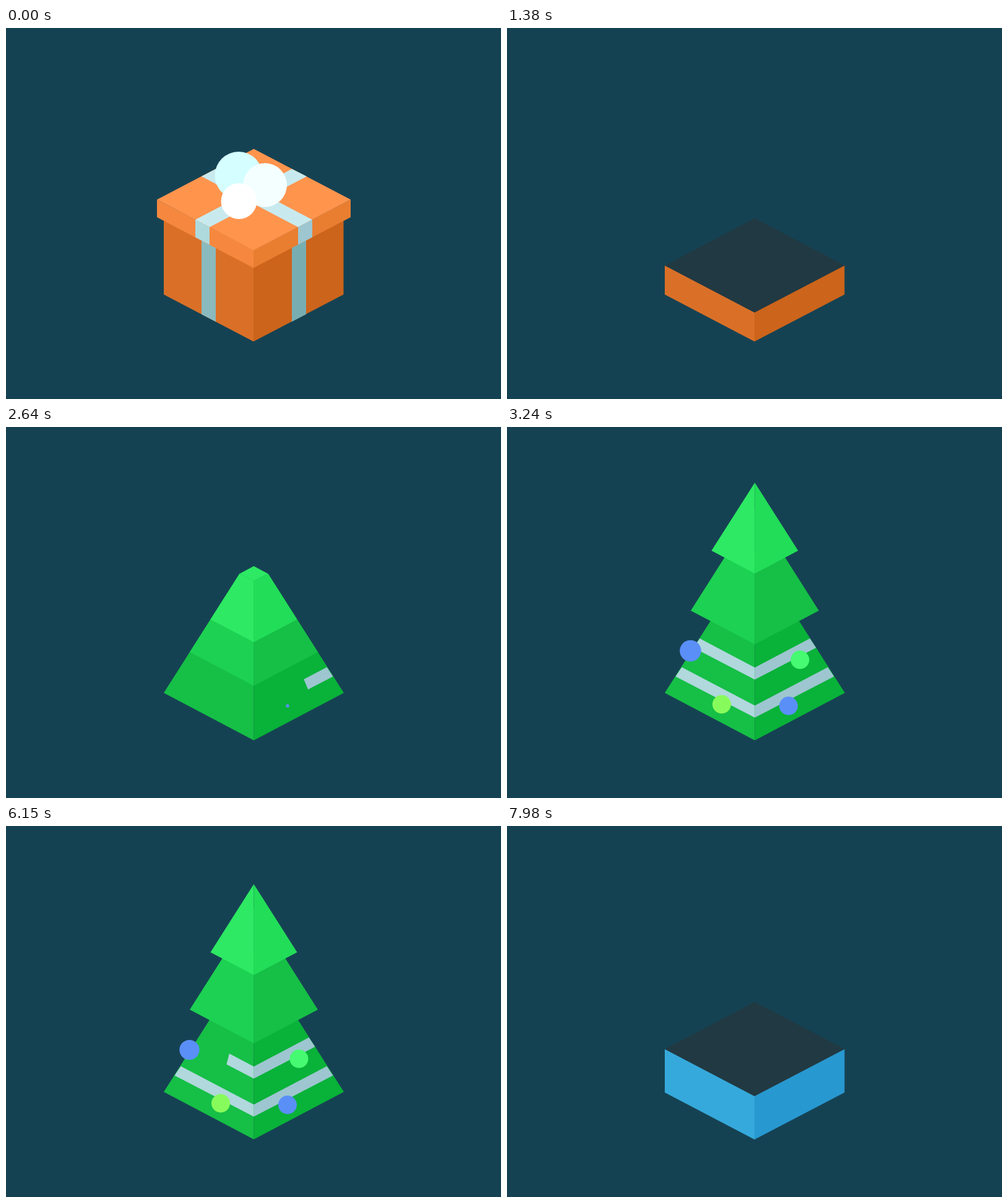
An HTML page with a canvas that plays this animation: 800x600 px, repeating every 8 s.

```html
<!DOCTYPE html>
<html lang="en">
<head>
<meta charset="utf-8">
<title>Gift and tree</title>
<style>
html, body { margin: 0; width: 100%; height: 100%; overflow: hidden; background: #154253; }
canvas { display: block; }
</style>
</head>
<body>
<canvas id="stage" width="800" height="600"></canvas>
<script>
const ctx = document.getElementById('stage').getContext('2d');
const LOOP = 8000;
const BG = '#154253', DARK = [33, 57, 66], GREEN = [45, 233, 99];
const LIME = '#88fb5c', BLUE = '#5a8ff8', MINT = '#46fa71';
const CX = 400.5, ISO = 0.527;

const clamp = v => Math.max(0, Math.min(1, v));
const span = (t, start, length) => clamp((t - start) / length);
const lerp = (a, b, u) => a + (b - a) * u;
const mixPoint = (a, b, u) => [lerp(a[0], b[0], u), lerp(a[1], b[1], u)];
const backIn = (u, s) => u * u * ((s + 1) * u - s);
const backOut = (u, s) => 1 - backIn(1 - u, s);
const smooth = u => u * u * (3 - 2 * u);

function poly(color, ...pts) {
  ctx.fillStyle = color;
  ctx.beginPath();
  pts.forEach(p => ctx.lineTo(p[0], p[1]));
  ctx.closePath();
  ctx.fill();
}

function disc(color, x, y, r) {
  if (r <= 0) return;
  ctx.fillStyle = color;
  ctx.beginPath();
  ctx.arc(x, y, r, 0, Math.PI * 2);
  ctx.fill();
}

function diamond(color, y, w) {
  const h = w * ISO;
  poly(color, [CX - w, y], [CX, y - h], [CX + w, y], [CX, y + h]);
}

function fadedDiamond(from, to, u) {
  const c = from.map((v, i) => Math.round(lerp(v, to[i], u)));
  diamond(`rgb(${c})`, 430.5, 144.5);
}

// ---------- gift ----------

function box(height, left, right) {
  const y = 431 - height;
  diamond(`rgb(${DARK})`, y, 145.5);
  poly(left, [255, y], [400, y + 76], [400, 507], [255, 431]);
  poly(right, [400, y + 76], [545.5, y], [545.5, 431], [400, 507]);
}

// A vertical ribbon that shortens towards its lower edge
function drape(color, x1, y1, x2, y2, len) {
  if (len > 0) poly(color, [x1, y1 - len], [x2, y2 - len], [x2, y2], [x1, y1]);
}

// Half of a band on the lid, measured from the lid's edge
function arm(a, b, farA, farB, size) {
  if (size > 0) poly('#c8eaee', a, b, mixPoint(b, farB, size), mixPoint(a, farA, size));
}

function lid(t) {
  const scale = 1 - backIn(span(t, 945, 295), 1.70158);
  if (scale <= 0) return;
  ctx.save();
  ctx.translate(400, 352);
  ctx.scale(scale, scale);
  ctx.translate(-400, -352);
  poly('#f5883e', [244, 277.5], [400, 359], [400, 388], [244, 306]);
  poly('#e97e31', [400, 359], [557, 277.5], [557, 306], [400, 388]);
  poly('#ff944d', [400.5, 195.5], [557, 277.5], [400, 359.5], [244, 277.5]);

  const size = 0.51 * (1 - span(t, 690, 280)) ** 1.6;
  const bands = [
    [[316, 240], [339, 228], [472, 322], [495, 310]],
    [[486, 240], [462, 228], [329, 322], [306, 310]]
  ];
  for (const [a, b, c, d] of bands) {
    arm(a, b, c, d, size);
    arm(c, d, a, b, size);
  }
  const len = 28.5 * (1 - span(t, 930, 90));
  drape('#aed9dd', 306, 338.5, 329, 350.5, len);
  drape('#9dc6d0', 472, 350.5, 495, 338.5, len);
  ctx.restore();
}

function gift(t) {
  const height = 125 * (1 - span(t, 1210, 440)) ** 2;
  if (height < 0.3) return fadedDiamond(DARK, GREEN, span(t, 1610, 180));
  box(height, '#da7028', '#cc641b');
  const len = Math.min(height, 125 * (1 - span(t, 1000, 220)));
  drape('#8bbabe', 316, 463, 339, 475, len);
  drape('#78aeb2', 462, 475, 485, 463, len);
  lid(t);
  const pompoms = [
    ['#d4feff', 376, 238.5, 38.5, 590],
    ['#f4ffff', 418.5, 254, 35.5, 540],
    ['#ffffff', 376.5, 280, 29, 490]
  ];
  for (const [color, x, y, r, start] of pompoms) {
    disc(color, x, y, r * (1 - backIn(span(t, start, 260), 1.7)));
  }
}

// ---------- tree ----------

const APEX = 201, SLOPE = 1.574;
const TIERS = [
  { w: 145.5, left: '#16bf46', right: '#09b239' },
  { w: 103.5, left: '#1dd152', right: '#16bf46' },
  { w: 70, left: '#2de963', right: '#22dd58' }
];

// Half width and height of the upper edge, height at the middle, then
// start and length of: right in, left in, right out, left out
const STRIPES = [
  { tier: 0, w: 118, y: 388.5, mid: 450.5, on: [2600, 130, 2730, 150], off: [6865, 90, 6570, 270] },
  { tier: 0, w: 89, y: 342, mid: 389, on: [2900, 130, 3030, 150], off: [6240, 200, 6040, 200] },
  { tier: 1, w: 75, y: 252, mid: 292, on: [3300, 230, 3570, 265], off: [5760, 255, 5550, 210] },
  { tier: 2, w: 38, y: 153, mid: 176, on: [3850, 170, 4030, 170], off: [5360, 160, 5210, 150] }
];
const SHADES = [['#b0d8dd', '#9dc6d0'], ['#c8e2e8', '#b0d5dc'], ['#dcf3f6', '#c8e2e8']];

// Tier, colour, place, start of growing and of shrinking
const BALLS = [
  [0, BLUE, 455, 451, 2630, 6800],
  [0, LIME, 347, 448.5, 2720, 6500],
  [0, MINT, 473.5, 376.5, 2910, 6300],
  [0, BLUE, 296.5, 362, 3078, 6080],
  [1, LIME, 446.5, 298, 3400, 5700],
  [1, MINT, 342, 237.5, 3650, 5530],
  [2, BLUE, 436.5, 154.5, 3870, 5320]
];

function frustum(tier, base, apex, cut) {
  const top = Math.max(apex, cut);
  if (top >= base) return;
  const W = tier.w, w = (top - apex) / SLOPE;
  const low = [CX, base + W * ISO], high = [CX, top + w * ISO];
  poly(tier.left, [CX - W, base], low, high, [CX - w, top]);
  poly(tier.right, [CX + W, base], low, high, [CX + w, top]);
}

function stripeSide(s, side, from, to, color) {
  if (to <= from) return;
  const upper = u => [CX + side * s.w * u, lerp(s.mid, s.y, u)];
  const lower = u => [CX + side * (s.w + 10) * u, lerp(s.mid + 19.5, s.y + 15, u)];
  poly(color, upper(from), upper(to), lower(to), lower(from));
}

function stripe(s, t) {
  const [r, rl, l, ll] = s.on, [ro, rol, lo, lol] = s.off;
  const right = span(t, r, rl) - span(t, ro, rol);
  const left = span(t, l, ll) - span(t, lo, lol);
  stripeSide(s, 1, 1 - right, 1, SHADES[s.tier][1]);
  stripeSide(s, -1, 0, left, SHADES[s.tier][0]);
}

function star(t) {
  const grow = backOut(span(t, 4190, 460), 2.2);
  const scale = t < 5200 ? grow : 1 - backIn(span(t, 5200, 280), 1.7);
  if (t < 4190 || scale <= 0.01) return;
  const turn = -0.09 - 0.9 * (1 - smooth(span(t, 4190, 460))) - 0.9 * span(t, 5200, 280) ** 2;
  ctx.save();
  ctx.translate(398.4, 82.4);
  ctx.rotate(turn);
  ctx.scale(scale, scale);
  ctx.beginPath();
  for (let i = 0; i < 10; i++) {
    const r = i % 2 ? 11.8 : 25.8, a = i * Math.PI / 5;
    ctx.lineTo(r * Math.sin(a), -r * Math.cos(a));
  }
  ctx.closePath();
  ctx.fillStyle = ctx.strokeStyle = LIME;
  ctx.lineWidth = 5;
  ctx.lineJoin = 'round';
  ctx.fill();
  ctx.stroke();
  ctx.restore();
}

// How far a tier has lifted off the one below, 0 to 1 with overshoot
function lift(t, start, end) {
  return t < 5000 ? backOut(span(t, start, 545), 6) : 1 - backIn(backTime(t, end), 6);
}
function backTime(t, end) {
  return span(t, end - 560, 560);
}

function tree(t) {
  const rise = t < 5000
    ? 1 - Math.cos(span(t, 2205, 485) * Math.PI / 2)
    : 1 - Math.sin(span(t, 6765, 315) * Math.PI / 2);
  if (rise < 0.001) return fadedDiamond(GREEN, DARK, span(t, 7080, 510));

  const cut = lerp(430, APEX, rise);
  const lift2 = 67 * lift(t, 2690, 6765);
  const lift3 = lift2 + 40 * lift(t, 2774, 6720);
  const lifts = [0, lift2, lift3];
  const whole = rise > 0.999;

  TIERS.forEach((tier, i) => {
    const apex = APEX - lifts[i];
    frustum(tier, apex + tier.w * SLOPE, apex, whole ? apex : cut);
    if (i === 0 && !whole) diamond(`rgb(${GREEN})`, cut, (cut - APEX) / SLOPE);
    STRIPES.forEach(s => { if (s.tier === i) stripe(s, t); });
    for (const [level, color, x, y, on, off] of BALLS) {
      if (level !== i || t < on) continue;
      const r = t < off ? backOut(span(t, on, 300), 2.2) : 1 - backIn(span(t, off, 280), 1.9);
      disc(color, x, y, 15 * r);
    }
  });
  star(t);
}

function draw(t) {
  ctx.fillStyle = BG;
  ctx.fillRect(0, 0, 800, 600);
  if (t < 1800) gift(t);
  else if (t < 7635) tree(t);
  else box(125 * span(t, 7640, 456) ** 2, '#35a9db', '#2898d0');
}

const begin = performance.now();
function tick() {
  draw((performance.now() - begin) % LOOP);
  requestAnimationFrame(tick);
}
tick();
</script>
</body>
</html>
```
